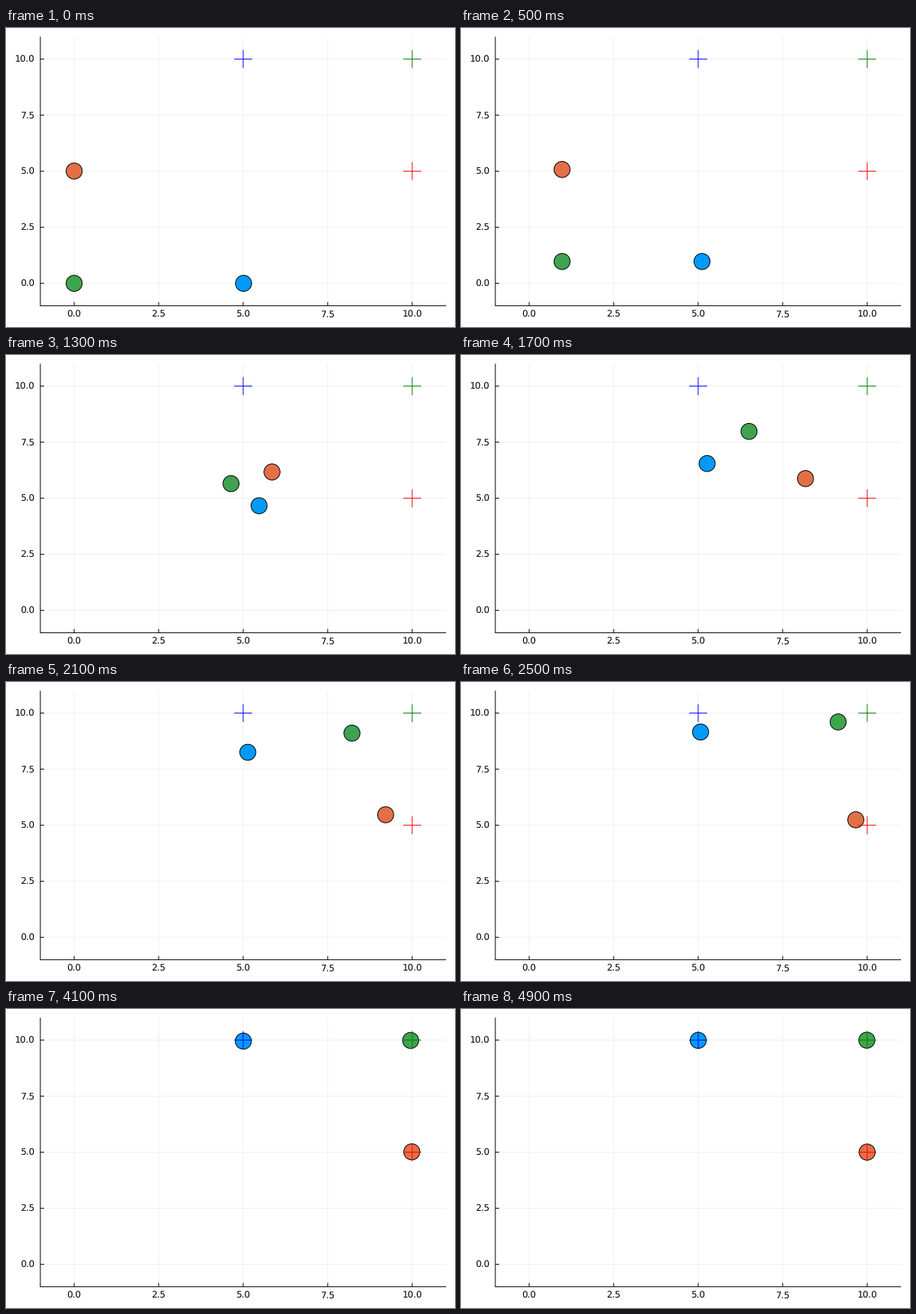
Animation of 600 by 400 pixels, one loop 4950 ms. Source, as a matplotlib script:

```python
import numpy as np
import matplotlib.pyplot as plt
from matplotlib.animation import FuncAnimation
from matplotlib.patches import Circle

W, H, DPI = 600, 400, 100
FRAMES, INTERVAL = 99, 50
PX = 72 / DPI  # one pixel in points
LEFT, RIGHT, TOP, BOTTOM = 45.9, 588, 11.6, 371.6
ACCEL = 0.0177
time = np.arange(FRAMES)

plt.rcParams["text.hinting"] = "none"


def to_x(v):
    return LEFT + (v + 1) / 12 * (RIGHT - LEFT)


def to_y(v):
    return BOTTOM - (v + 1) / 12 * (BOTTOM - TOP)


def travel(cruise, rate):
    """Go from 0 to 10: speed up evenly, cruise, then settle on the goal."""
    pos = np.zeros(FRAMES)
    for n in range(1, FRAMES):
        left = 10 - pos[n - 1]
        pos[n] = pos[n - 1] + min(ACCEL * n, cruise, rate * left)
    return pos


def swerve(push, middle):
    """Sideways dodge that swells around the middle and fades away."""
    return push * np.exp(-0.083 * time) / (1 + np.exp(-0.32 * (time - middle)))


fig = plt.figure(figsize=(W / DPI, H / DPI), dpi=DPI, facecolor="white")
ax = fig.add_axes([0, 0, 1, 1])
ax.set_xlim(0, W)
ax.set_ylim(H, 0)
ax.axis("off")


def line(xs, ys, color, z=1):
    ax.plot(xs, ys, color=color, lw=PX, zorder=z, snap=False,
            solid_capstyle="butt")


font = dict(family="DejaVu Sans", size=12 * PX, color="black", va="baseline")
for v in np.arange(0, 10.1, 2.5):
    x, y = to_x(v), to_y(v)
    line([x, x], [TOP, BOTTOM], "#f0f0f0")
    line([LEFT, RIGHT], [y, y], "#f0f0f0")
    line([x, x], [BOTTOM, BOTTOM - 5], "black", z=2)
    line([LEFT, LEFT + 5], [y, y], "black", z=2)
    ax.text(x, 387, f"{v:.1f}", ha="center", **font)
    ax.text(38, y + 4.4, f"{v:.1f}", ha="right", **font)
line([LEFT, LEFT], [TOP, BOTTOM + 0.5], "black", z=2)
line([LEFT, RIGHT], [BOTTOM, BOTTOM], "black", z=2)

for gx, gy, color in ((5, 10, "blue"), (10, 5, "red"), (10, 10, "green")):
    x, y = to_x(gx), to_y(gy)
    line([x - 12, x + 12], [y, y], color, z=5)
    line([x, x], [y - 12, y + 12], color, z=5)

# The green disc gives way sideways, the blue one waits, the orange one passes.
paths = (
    (5 + swerve(4.47, 18.7), travel(0.235, 0.087), "#009afa"),
    (travel(0.356, 0.1), 5 + swerve(15.3, 23.9), "#e36f47"),
    (travel(0.233, 0.087), travel(0.328, 0.097), "#3ea44e"),
)
discs = [ax.add_patch(Circle((0, 0), 10.75, facecolor=color, edgecolor="black",
                             lw=PX, zorder=3))
         for _, _, color in paths]


def update(n):
    for disc, (xs, ys, _) in zip(discs, paths):
        disc.center = to_x(xs[n]), to_y(ys[n])
    return discs


anim = FuncAnimation(fig, update, frames=FRAMES, interval=INTERVAL,
                     repeat=True, repeat_delay=0)
plt.show()
```
